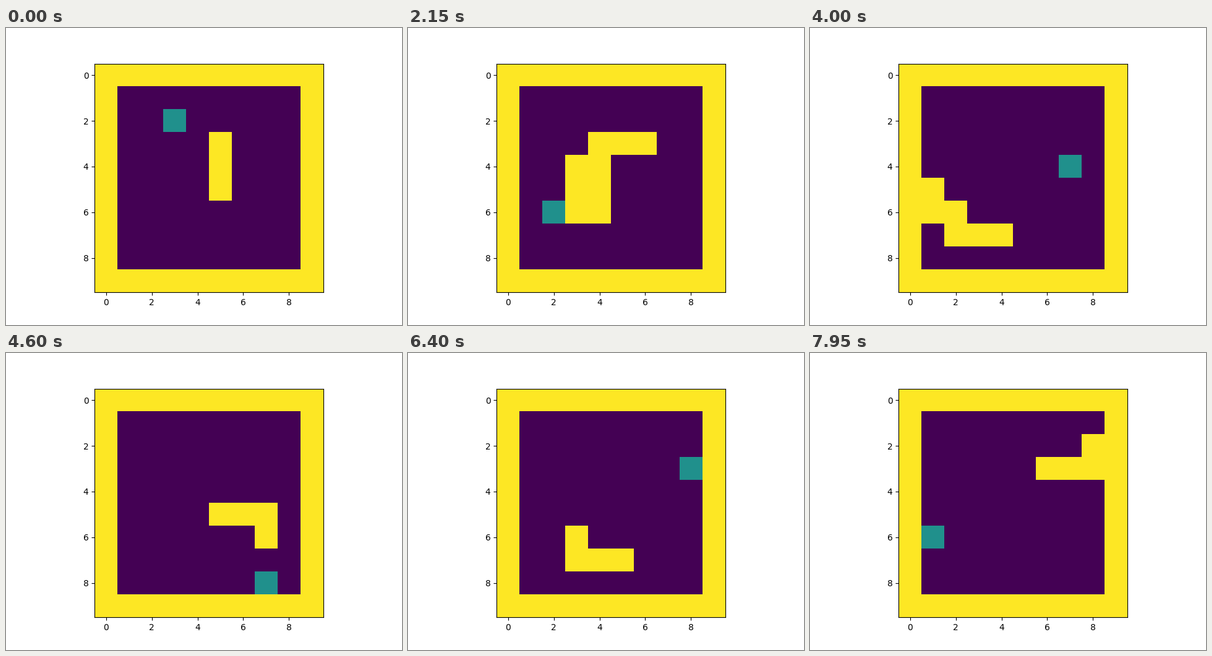
These frames come from a looping animation (640x480 px, 8000 ms). A matplotlib script:

```python
import numpy as np
import matplotlib.pyplot as plt
from matplotlib.animation import FuncAnimation

SIZE = 10
STEP_MS = 50
START = [(5, 3), (5, 4), (5, 5)]  # tail first, (column, row)


def food(x, y):
    return (x, y), True


def turn(x, y):
    return (x, y), False


# Each round: its number of frames, then the stops the snake heads for.
# The last food is never reached, the round ends before.
ROUNDS = [
    (47, [food(3, 2), food(1, 3), food(8, 4), turn(8, 6), turn(1, 3),
          food(1, 2), food(6, 2), turn(4, 3), turn(3, 5), food(4, 6),
          food(2, 6), food(2, 2)]),
    (42, [food(8, 7), food(5, 8), turn(7, 5), turn(1, 1), turn(1, 6),
          food(4, 7), food(7, 4), food(8, 8)]),
    (33, [food(7, 5), food(7, 8), turn(3, 6), turn(3, 4), food(4, 2),
          food(1, 1), food(4, 7), food(1, 5)]),
    (28, [turn(3, 6), food(5, 7), food(8, 3), food(1, 1), food(4, 6)]),
    (10, [turn(7, 2), food(8, 2), turn(6, 3), food(1, 6)]),
]


def make_board(snake, bait):
    board = np.ones((SIZE, SIZE))
    board[1:-1, 1:-1] = 0
    board[bait[1], bait[0]] = 0.5
    for x, y in snake:
        board[y, x] = 1
    return board


def play(frames, stops):
    """Yield one board per frame; the snake moves in stairs to each stop."""
    snake = list(START)
    stops = list(stops)
    axis = 1  # 0 across, 1 down
    for _ in range(frames):
        yield make_board(snake, next(cell for cell, eaten in stops if eaten))
        goal, grows = stops[0]
        gap = np.subtract(goal, snake[-1])
        if gap[1 - axis]:
            axis = 1 - axis
        head = list(snake[-1])
        head[axis] += int(np.sign(gap[axis]))
        snake.append(tuple(head))
        arrived = snake[-1] == goal
        if arrived:
            stops.pop(0)
        if not (arrived and grows):
            snake.pop(0)


boards = [board for frames, stops in ROUNDS for board in play(frames, stops)]

fig, ax = plt.subplots(figsize=(6.4, 4.8), dpi=100)
image = ax.imshow(boards[0], cmap="viridis", vmin=0, vmax=1)


def draw(i):
    image.set_data(boards[i])
    return [image]


anim = FuncAnimation(fig, draw, frames=len(boards), interval=STEP_MS,
                     repeat=True, repeat_delay=0)
plt.show()
```
